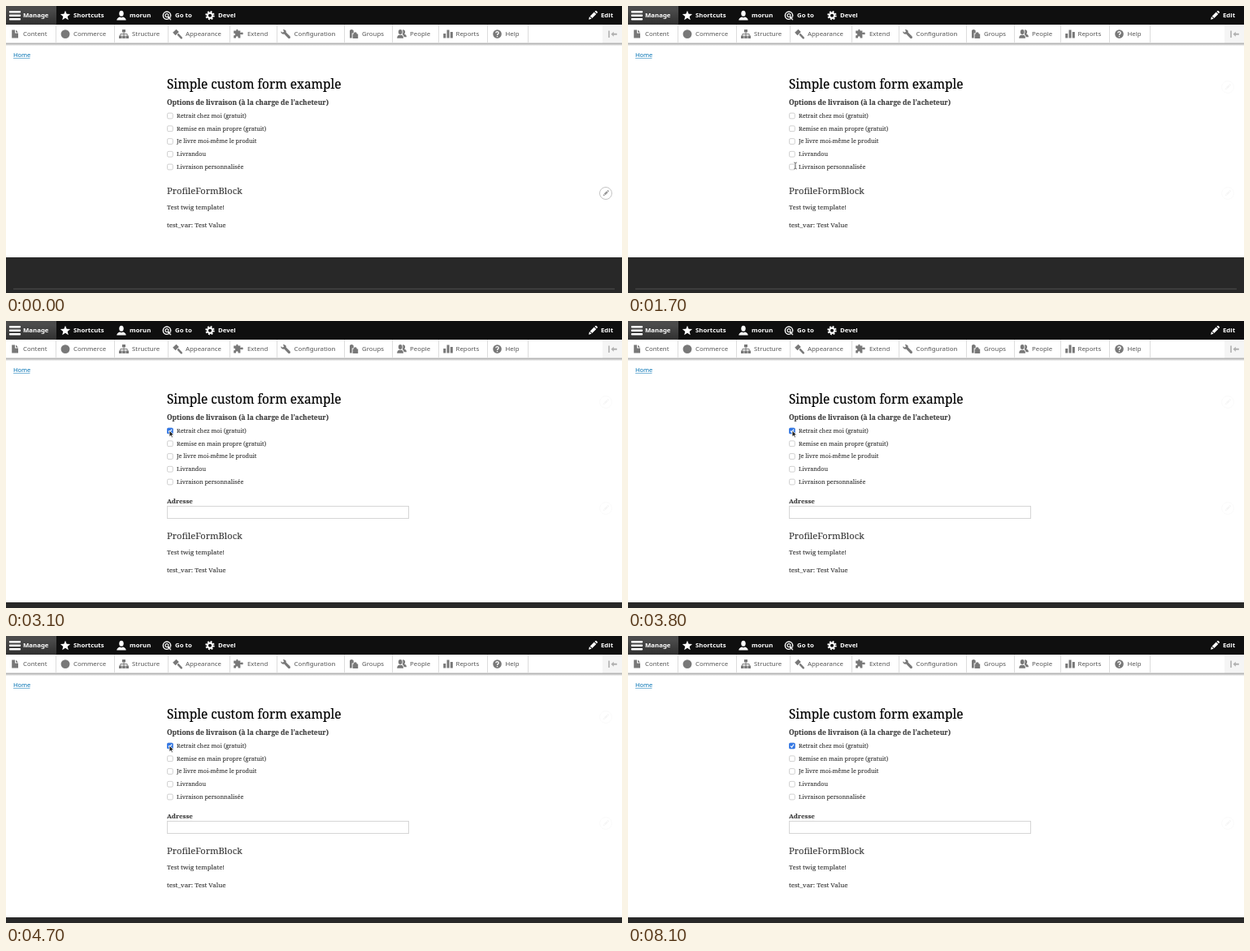
Recreate the animation shown at these times as an HTML page. Size 758x354 px, loop 8200 ms.

```html
<!DOCTYPE html>
<html lang="en">
<head>
<meta charset="utf-8">
<title>Simple custom form example</title>
<style>
html, body { margin: 0; width: 100%; height: 100%; overflow: hidden; background: #fff; }
svg { display: block; width: 758px; height: 354px; }
text { white-space: pre; }
.bar text { font: 700 7.8px "Noto Sans", "Open Sans", sans-serif; fill: #fff; }
.tray text { font: 500 7.85px "Noto Sans", "Open Sans", sans-serif; fill: #565656; }
.page text { font-family: "Noto Serif", "Liberation Serif", serif; fill: #3b3b3b; stroke: #3b3b3b; stroke-width: .12; }
.page .title { fill: #000; stroke: #000; stroke-width: .2; }
.page .crumb { font: 7.5px "Noto Sans", "Open Sans", sans-serif; fill: #0071b3; stroke: none; }
.bold { font-weight: 700; }
</style>
</head>
<body>
<svg viewBox="0 0 758 354" xmlns="http://www.w3.org/2000/svg">
  <defs>
    <linearGradient id="tab" x1="0" y1="0" x2="0" y2="1">
      <stop offset=".2" stop-color="#4b4b4b"/><stop offset="1" stop-color="#303030"/>
    </linearGradient>
    <linearGradient id="shade" x1="0" y1="0" x2="0" y2="1">
      <stop offset="0" stop-color="#000" stop-opacity=".3"/><stop offset="1" stop-color="#000" stop-opacity="0"/>
    </linearGradient>
    <path id="pencil" d="M-5 5l1-3.6 2.6 2.6zM-3.3.7l5-5 2.6 2.6-5 5zM2.4-4.9l1-.9q.6-.4 1.1 0l1.3 1.3q.4.5 0 1.1l-.9 1z"/>
    <g id="button">
      <circle r="7.5" fill="#fff" stroke="#c4c4c4"/>
      <use href="#pencil" fill="#999" transform="scale(.66)"/>
    </g>
  </defs>
  <rect width="758" height="354" fill="#fff"/>

  <g class="page">
    <text class="crumb" x="9" y="62.5">Home</text>
    <path d="M9 64.5h20.5" stroke="#0071b3" stroke-width=".5"/>
    <text class="title" x="198" y="102" font-size="15.4">Simple custom form example</text>
    <text class="bold" x="198" y="122" font-size="8.42">Options de livraison (à la charge de l’acheteur)</text>
    <g id="options"></g>
    <g id="address">
      <text class="bold" x="198" y="224.6" font-size="7.9">Adresse</text>
      <rect x="198.5" y="228.5" width="297" height="15" fill="#fff" stroke="#d6d6d6"/>
    </g>
    <g id="below">
      <text x="198" y="232" font-size="11.15">ProfileFormBlock</text>
      <text x="198" y="251" font-size="7.87">Test twig template!</text>
      <text x="198" y="272.8" font-size="7.95">test_var: Test Value</text>
      <rect y="310" width="758" height="90" fill="#282828"/>
      <path d="M9 349h740" stroke="#505050" stroke-width="1"/>
    </g>
  </g>

  <use id="penCrumb" href="#button" x="738" y="66"/>
  <use id="penTitle" href="#button" x="738" y="100"/>
  <use id="penBlock" href="#button" x="738" y="231"/>

  <rect y="46" width="758" height="3.5" fill="url(#shade)"/>
  <g class="tray">
    <rect y="23" width="758" height="23" fill="#fff"/>
    <rect x="734" y="23" width="24" height="23" fill="#f5f5f5"/>
    <path d="M0 46h758" stroke="#aaa" stroke-width=".8"/>
    <path id="rules" stroke="#ddd"/>
    <path d="M742 30.5v8.5" stroke="#b0b0b0" stroke-width="1.6"/>
    <path d="M744.5 34.7l3.3-3v2h4v2h-4v2z" fill="#b0b0b0"/>
    <g id="trayItems"></g>
  </g>

  <g class="bar">
    <rect width="758" height="23" fill="#0f0f0f"/>
    <rect width="62" height="23" fill="url(#tab)"/>
    <g id="barItems"></g>
  </g>

  <path id="arrow" d="M0 0v7.8l1.8-1.6 1.2 2.7 1.4-.6-1.2-2.6h2.4z" fill="#222" stroke="#fff" stroke-width=".8"/>
  <path id="beam" d="M-1.8-4q1.5 0 1.8 1 .3-1 1.8-1M0-3v6M-1.8 4q1.5 0 1.8-1 .3 1 1.8 1" fill="none" stroke="#555" stroke-width=".9"/>
</svg>
<script>
const $ = id => document.getElementById(id);
const LOOP = 8200, STEP = 100;

// Icons are drawn around their own centre.
const shapes = {
  menu: '<path d="M-6-4.5H6M-6 0H6M-6 4.5H6" stroke="#fff" stroke-width="2.4" stroke-linecap="round"/>',
  star: '<path d="M0-6l1.7 4.1 4.4.3-3.4 2.8 1.1 4.3L0 3.1l-3.8 2.4 1.1-4.3-3.4-2.8 4.4-.3z"/>',
  user: '<ellipse cy="-2.4" rx="2.7" ry="3.5"/><path d="M-5.7 5.8Q-5.7 3-2 1.7q2 1.6 4 0Q5.7 3 5.7 5.8z"/>',
  target: '<circle r="4.7" fill="none" stroke="#fff" stroke-width="1.4"/><circle r="2" fill="none" stroke="#fff" stroke-width="1.2"/><path d="M0 0l5.5 2.2-2 .8 2 2-1 1-2-2-.8 1.8z" stroke="#0f0f0f" stroke-width=".4"/>',
  gear: '<circle r="3.1" fill="none" stroke="#fff" stroke-width="2.2"/><circle r="4.7" fill="none" stroke="#fff" stroke-width="2" stroke-dasharray="1.85"/>',
  pencil: '<use href="#pencil"/>',
  page: '<path d="M-3.8-5H0v4h4v6h-7.8zM1-5l3 3H1z"/>',
  dot: '<circle r="5.4"/>',
  tree: '<path d="M-2-5.5h4v3.4h-4zM-6 2h3.6v3.5H-6zM-1.8 2h3.6v3.5h-3.6zM2.4 2H6v3.5H2.4z"/><path d="M0-2v4M-4.2 2V0h8.4v2" fill="none" stroke="#787878"/>',
  brush: '<path d="M-5.8-1.8L-1.5-5.9 1.8-2.6-2.5 1.6zM-.5.8L1.2-.9 5.7 4q.8 1.2-.2 1.8-.8.5-1.6-.2z"/>',
  puzzle: '<path d="M-5.8-4.2H-2.6q-.8-1.6 1-1.6t1 1.6H2.4v2.6q3.4-1.2 3.4.9T2.4.2V4.8H-.4q.5-2.2-1.3-2.2T-3 4.8h-2.8V1.6q2 .4 2-1.2t-2-1.2z"/>',
  wrench: '<path d="M-5.8-3.4l2.3 1.6 1.6-1.5-1.4-2.3q2.7-.5 3.8 1.6.4 1 .1 2L5.6 3q.8 1.3-.1 2.2t-2.2 0L-1.7 0q-1.8.5-3-.6-1.2-1.2-1.1-2.8z"/>',
  groups: '<path d="M-5-4.4q2-2.4 4.7 0V-1h-2v6H-5z"/><path d="M-1.4 0h1.2q0-2.3 2-2.3T3.8 0h1.4v5.3h-6.6z"/>',
  people: '<ellipse cx="-1.8" cy="-2.6" rx="2.4" ry="3"/><path d="M-5.8 5.2q0-3.4 2.7-4h2.6q2.5.6 2.5 4zM1-5.2q3-.7 3.2 2.4 0 2-1.2 2.7 3 1 2.9 3.8H2.8Q2.5 1.4.8.3 2.3-2.4 1-5.2z"/>',
  bars: '<path d="M-5.8-.5h3v5.5h-3zM-1.5-5h3V5h-3zM2.8-2.5h3V5h-3z"/>',
  help: '<circle r="5.3"/><path d="M-1.7-1.3Q-1.6-3 0-3t1.7 1.5Q1.7-.6.8 0 0 .5 0 1.3M0 2.3v1.3" fill="none" stroke="#fff" stroke-width="1.3"/>'
};

// icon, icon x, label x, label
const barItems = [
  ['menu', 11, 21, 'Manage'], ['star', 73, 83, 'Shortcuts'], ['user', 142, 152, 'morun'],
  ['target', 198, 208, 'Go to'], ['gear', 251, 261, 'Devel'], ['pencil', 722, 732, 'Edit']
];
const trayItems = [
  ['page', 11, 21, 'Content'], ['dot', 73, 83, 'Commerce'], ['tree', 145, 155, 'Structure'],
  ['brush', 211, 221, 'Appearance'], ['puzzle', 286, 297, 'Extend'], ['wrench', 344, 354.5, 'Configuration'],
  ['groups', 428, 438, 'Groups'], ['people', 487, 497, 'People'], ['bars', 544, 553.5, 'Reports'], ['help', 604.5, 614.5, 'Help']
];
const draw = (items, y, fill) => items.map(([icon, x, tx, label]) =>
  `<g transform="translate(${x} ${y})" fill="${fill}">${shapes[icon]}</g><text x="${tx}" y="${y + 2.6}">${label}</text>`).join('');

$('barItems').innerHTML = draw(barItems, 11.7, '#fff');
$('trayItems').innerHTML = draw(trayItems, 34.6, '#787878');
$('rules').setAttribute('d', [61, 133, 199, 275, 333, 416, 475, 532, 592, 642].map(x => `M${x + .5} 23v23`).join(''));

const labels = ['Retrait chez moi (gratuit)', 'Remise en main propre (gratuit)', 'Je livre moi-même le produit', 'Livrandou', 'Livraison personnalisée'];
$('options').innerHTML = labels.map((label, i) => {
  const y = 135.4 + i * 15.75;
  return `<rect x="198.5" y="${y - 3.3}" width="6.8" height="6.8" rx="1.5" fill="#fff" stroke="#c6c6c6" stroke-width=".8"/>
    <text x="210" y="${y + 2.5}" font-size="7.2">${label}</text>`;
}).join('') + `<g id="tick"><rect x="198.1" y="131.7" width="7.6" height="7.6" rx="1.6" fill="#3478e5"/>
  <path d="M200 135.7l1.5 1.7 2.5-3.8" fill="none" stroke="#fff" stroke-width="1.1"/></g>`;
const firstBox = $('options').querySelector('rect');

// time, x, y
const path = [
  [100, 77, 14], [300, 130, 100], [500, 190, 225], [600, 212, 243], [800, 232, 180], [900, 232, 180],
  [1300, 216, 190], [1700, 206, 197], [2000, 206, 197],
  [2500, 203, 164], [2900, 201, 135], [3400, 201, 135], [3800, 202, 135], [4400, 202, 135],
  [4700, 201, 135], [5200, 201, 135], [5500, 300, 112], [5800, 500, 62], [6100, 638, -3.5],
  [7800, 638, -3.5], [8000, 660, 52]
];
// time, opacity
const fades = {
  penBlock: [[0, 1], [500, 1], [800, .08]],
  penTitle: [[200, 0], [300, 1], [1000, 1], [1400, .08], [5300, .08], [5400, 1], [5600, 1], [5800, 0]],
  penCrumb: [[5600, 0], [5700, .8], [5800, .8], [6000, 0], [7900, 0], [8000, .5], [8100, 0]]
};
const toggles = [3100, 4100, 4600];
const presses = [3000, 4000, 4500];

function at(keys, t) {
  const n = keys.findIndex(k => k[0] > t);
  if (n < 0) return keys[keys.length - 1].slice(1);
  if (n === 0) return keys[0].slice(1);
  const a = keys[n - 1], b = keys[n], p = (t - a[0]) / (b[0] - a[0]);
  return a.slice(1).map((v, i) => v + (b[i + 1] - v) * p);
}
const show = (el, on) => el.setAttribute('visibility', on ? 'visible' : 'hidden');

function render(now) {
  const t = Math.floor((now % LOOP) / STEP) * STEP;
  const open = toggles.filter(k => t >= k).length % 2 === 1;
  show($('address'), open);
  show($('tick'), open);
  $('below').setAttribute('transform', `translate(0 ${open ? 37 : 0})`);
  firstBox.setAttribute('fill', presses.includes(t) ? '#d0d0d0' : '#fff');

  for (const id in fades) $(id).setAttribute('opacity', at(fades[id], t)[0]);

  const [x, y] = at(path, t);
  const live = t >= 100 && t < 8100, overText = t >= 1000 && t < 2200;
  show($('arrow'), live && !overText);
  show($('beam'), live && overText);
  for (const id of ['arrow', 'beam']) $(id).setAttribute('transform', `translate(${x} ${y})`);
}

const start = performance.now();
function tick(now) {
  render(Math.max(0, now - start));
  requestAnimationFrame(tick);
}
render(0);
requestAnimationFrame(tick);
</script>
</body>
</html>
```
